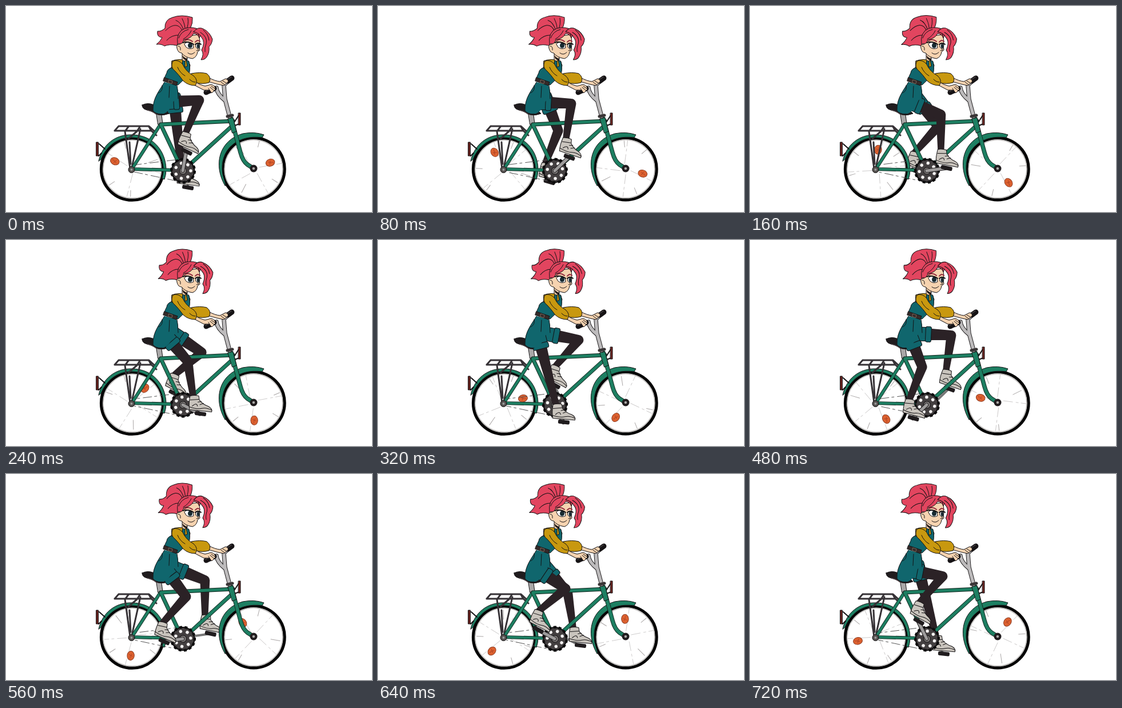
Animation, 640 px wide and 360 px high, one loop 0.8 s. Source, as an HTML page:

```html
<!DOCTYPE html>
<html lang="en">
<head>
<meta charset="utf-8">
<title>Cyclist</title>
<style>
  html, body { margin: 0; width: 100%; height: 100%; overflow: hidden; background: #fff; }
  svg { display: block; width: 100vw; height: 100vh; }
  path, line, circle, ellipse, rect { stroke-linecap: round; stroke-linejoin: round; }
  .ink { stroke: #141214; stroke-width: 1; }
  .line { fill: none; stroke: #141214; stroke-width: 1; }
  .teal { fill: #10666d; }
  .gold { fill: #c8980f; }
  .skin { fill: #f6d3b0; }
  .hair { fill: #e2455f; }
  .tights { fill: #2b2226; }
  .shoe { fill: #c9c4bd; }
  .dark { fill: #201c1e; }
  .tube { fill: none; stroke: #1d7f62; }
  .edge { fill: none; stroke: #12241d; }
  .rack { fill: none; stroke: #363236; stroke-width: 3; }
</style>
</head>
<body>
<svg viewBox="0 0 640 360" preserveAspectRatio="none">
  <defs>
    <g id="shoe">
      <rect class="dark" x="-9" y="-4" width="20" height="7" rx="2"/>
      <path class="shoe ink" d="M-21-29Q-13-32-6-31L-4-24Q3-17 13-15Q21-12 20-6L-19-5Q-22-16-21-29Z"/>
      <path class="line" d="M-20-10Q-6-7 2-10T20-9M-20-22L-5-25M-6-20L0-22M-2-16L4-19M-15-12Q-8-20-6-13"/>
    </g>
    <g id="wheel">
      <circle r="54.2" fill="#fff" stroke="#050505" stroke-width="5.2"/>
      <circle r="50.6" fill="none" stroke="#b9b6b4" stroke-width="1.2"/>
    </g>
    <g id="spokes" fill="none" stroke="#aaa6a6" stroke-width="1">
      <path d="M31 37L24 28M-34 32L-22 21M-16-46L-12-36M26-42L20-33"/>
      <path d="M10 1L49 8M-9 6L-48 12M3 10L9 48M-4-8L-10-48" stroke-width=".7" stroke-dasharray="16 6 4 5" opacity=".8"/>
    </g>
    <g id="reflector">
      <ellipse rx="8" ry="6.2" fill="#dd612f" stroke="#8f3e25" stroke-width="1"/>
      <path d="M-3-2L2 1M1-3L-2 3M3 0L5 2" stroke="#a63f24" stroke-width=".8"/>
    </g>
    <path id="main" d="M271 207L397 201M271 208L305 280M396 209L318 280"/>
    <path id="stays" d="M270 207L220 285L300 287"/>
    <path id="fork" d="M394 197L410 256Q414 271 422 277L433 284"/>
  </defs>

  <g id="far">
    <line class="crank" stroke="#777" stroke-width="4"/>
    <path class="tights leg"/>
    <use class="foot" href="#shoe"/>
    <g class="thigh">
      <rect class="teal ink" x="-12" y="-12" width="29" height="24" rx="5"/>
      <rect class="teal ink" x="13" y="-13.5" width="10" height="27" rx="3"/>
    </g>
  </g>

  <!-- wheels -->
  <use href="#wheel" x="220.7" y="285"/>
  <use href="#wheel" x="433" y="284.7"/>
  <g id="rear"><use href="#spokes"/><use href="#reflector" x="33.3" class="rf"/></g>
  <g id="front"><use href="#spokes"/><use href="#reflector" x="31" class="rf"/></g>

  <path id="chain" d="M222 278L303 268M224 290L304 307" fill="none" stroke="#555" stroke-width="1" stroke-dasharray="15 5 4 6"/>

  <!-- fenders, lights and rack -->
  <g fill="#1d7f62" class="ink">
    <path d="M162 271C168 243 191 224 220 225C255 225 279 251 280 285Q280 295 277 303L273 301Q276 291 275 281C271 251 249 230 220 230C194 230 176 245 166 268Z"/>
    <path d="M383 314C362 278 372 235 414 223Q434 219 451 225L448 230C405 224 372 251 379 294L384 312Z"/>
  </g>
  <path class="line" d="M163 241L173 250M162 262L167 257M398 205L407 191M400 209L408 206" style="stroke-width:2"/>
  <path d="M158 238h3.5v24h-3.5ZM406.500 187h3.500v21h-3.500Z" fill="#67231f" class="ink"/>
  <path class="rack" d="M190 218H254L263 226M197 210H250L262 221M190 218L197 210M214 211L208 219L217 284M234 211L229 219L214 232M235 215L220 282M254 218L250 211M216 238L218 276"/>

  <!-- frame -->
  <path d="M263 188L272 190L274 206L266 207Z" fill="#aaa8a8" class="ink"/>
  <use href="#stays" class="edge" stroke-width="6"/><use href="#stays" class="tube" stroke-width="4.300"/>
  <use href="#main" class="edge" stroke-width="7"/><use href="#main" class="tube" stroke-width="5.200"/>
  <use href="#fork" class="edge" stroke-width="7.500"/><use href="#fork" class="tube" stroke-width="5.700"/>
  <path d="M388 197L397 195L403 219L396 222Z" fill="#1d7f62" class="ink"/>
  <circle cx="219.500" cy="286" r="5.500" fill="#55514f" class="ink"/>
  <circle cx="219.500" cy="286" r="2" fill="#999"/>
  <circle cx="433" cy="284" r="6.500" class="dark"/>
  <circle cx="433" cy="284" r="2.300" fill="#a9a6a4"/>

  <!-- saddle -->
  <path class="dark ink" d="M238 173Q248 168 259 173Q274 175 285 188Q276 192 266 190Q255 183 244 181Q238 179 238 173Z"/>
  <path d="M247 182Q255 183 264 190" fill="none" stroke="#4b4143" stroke-width="1.500"/>

  <!-- stem and bars -->
  <g fill="none">
    <path id="bars" d="M391 193L383 163L381 139M383 165Q369 154 368 143L356 149M381 138L390 130" stroke="#232122" stroke-width="7.400"/>
    <path d="M391 193L383 163L381 139M383 165Q369 154 368 143L356 149M381 138L390 130" stroke="#bdbbbc" stroke-width="5.400"/>
    <path d="M387 193L396 191" stroke="#3a3536" stroke-width="5"/>
    <path d="M350 151L364 144M388 131L395 126" stroke="#161315" stroke-width="9"/>
    <path d="M349 149L359 144M388 128L394 124" stroke="#4a4547" stroke-width="1.500"/>
  </g>

  <g id="ring">
    <circle r="20" fill="#433f40" stroke="#0d0c0d" stroke-width="2"/>
    <circle r="20.300" fill="none" stroke="#0d0c0d" stroke-width="4.500" pathLength="28" stroke-dasharray="1.100 .9" style="stroke-linecap:butt"/>
    <circle r="13.500" fill="none" stroke="#f3f1f0" stroke-width="5.500" pathLength="14" stroke-dasharray="0.010 1.990"/>
    <circle r="6" fill="#807c7b" class="ink"/>
  </g>

  <g id="near">
    <line class="crank" stroke="#242223" stroke-width="7"/>
    <line class="crank" stroke="#9d9b9b" stroke-width="5"/>
    <path class="tights leg"/>
    <use class="foot" href="#shoe"/>
    <g class="thigh">
      <rect class="teal ink" x="-14" y="-13" width="32" height="26" rx="6"/>
      <rect class="teal ink" x="13" y="-14" width="10" height="28" rx="3"/>
    </g>
  </g>

  <!-- torso -->
  <path class="teal" d="M277 133C270 146 256 160 257 183Q263 190 276 188Q286 184 290 172Q293 163 301 162Q302 147 298 138Z"/>
  <path class="line" d="M277 133C270 146 256 160 257 183Q263 190 273 189M299 138Q301 150 301 162M273 139Q275 148 267 152M286 140L285 160"/>
  <path class="gold ink" d="M290 96Q302 91 319 96L322 104L318 118L290 114Z"/>
  <path class="teal ink" d="M289 108Q299 114 307 108L309 95L313 96L313 107L317 105L315 94L320 97Q323 110 320 119Q312 128 301 138L276 130Q278 122 281 117Q282 110 289 108Z"/>
  <path d="M277 125L300 133L298 139L275 131Z" fill="#352a29" class="ink"/>
  <path d="M285 129L291 131L290 136L284 134Z" fill="none" stroke="#78675a" stroke-width="1"/>

  <!-- arms -->
  <path class="skin ink" d="M354 125Q365 131 374 132L384 127Q390 129 388 133L381 139L371 137L353 132Z"/>
  <path class="line" d="M379 131L386 135M376 133L383 138"/>
  <path class="gold ink" d="M324 118Q340 115 351 118Q360 125 355 134Q344 137 330 134Z"/>
  <path class="skin ink" d="M330 132Q339 138 348 140L359 137Q367 140 366 146L360 152L355 147L346 147L329 138Z"/>
  <path class="line" d="M357 142L364 148M359 140L366 145M354 144L358 150"/>
  <path class="gold ink" d="M292 96Q302 93 309 102Q314 114 328 122Q337 130 331 139Q319 139 310 131Q302 120 296 114Q286 107 292 96Z"/>
  <path class="line" d="M300 107Q304 117 313 122M331 133Q325 133 321 128"/>

  <!-- head -->
  <g id="tail">
    <path class="hair ink" d="M310 54C304 53 305 65 298 69Q286 66 277 70Q272 66 263 67Q270 62 273 55Q263 54 265 44Q271 45 278 39Q277 24 291 20Q307 14 326 20Q327 30 322 40Q315 49 310 54Z"/>
    <path class="line" d="M309 45C302 27 288 34 279 43M311 43Q306 28 297 25M315 42Q320 32 318 21M303 51Q290 50 281 60M313 43Q314 34 308 22"/>
  </g>
  <path class="skin ink" d="M308 82L308 94Q313 99 317 93L316 86Z"/>
  <path d="M308 86Q313 92 318 92L316 96L310 92Z" fill="#1b1516"/>
  <path class="skin ink" d="M306 54L337 50Q340 62 338 69L339 77L335 80Q334 89 326 92Q313 90 307 82Q301 82 299 74Q297 66 304 67Z"/>
  <path class="line" d="M301 70Q306 70 305 77M333 72L337 77L333 78M318 82Q324 87 330 81"/>
  <path d="M312 66Q319 60 327 66L328 73Q321 77 315 72Z" fill="#fff" class="ink"/>
  <path d="M332 67Q336 64 339 68L338 74Q334 75 332 72Z" fill="#fff" class="ink"/>
  <ellipse cx="322" cy="69" rx="4" ry="4.600" fill="#182a31"/>
  <ellipse cx="336" cy="70" rx="2.300" ry="3.700" fill="#182a31"/>
  <path d="M309 64Q318 61 328 67M331 67Q336 63 341 67" fill="none" stroke="#141214" stroke-width="2"/>
  <path d="M312 61Q319 56 326 62M331 63Q335 58 339 62" fill="none" stroke="#8f2638" stroke-width="2"/>
  <path class="hair ink" d="M300 67Q297 45 313 39Q329 35 341 43Q341 51 338 56Q335 48 328 48Q324 57 311 59Q308 68 303 66Z"/>
  <path class="line" d="M302 56Q306 44 319 41M310 58Q320 52 324 43M333 41Q337 47 337 53"/>
  <g id="lock">
    <path class="hair ink" d="M328 45Q336 35 345 40Q356 45 361 58Q360 67 355 71Q356 82 351 89Q348 94 341 94Q347 84 342 77Q349 63 342 55Q338 47 328 45Z"/>
    <path class="line" d="M340 46Q353 54 350 66Q347 73 348 80M345 42Q354 49 355 60"/>
  </g>
</svg>
<script>
const STEP = 80, STEPS = 10, THIGH = 58, SHIN = 64, CRANK = 34;
const rad = Math.PI / 180;
const $ = id => document.getElementById(id);
const set = (el, attrs) => { for (const k in attrs) el.setAttribute(k, attrs[k]); };
const polar = (p, r, a) => [p[0] + r * Math.cos(a), p[1] + r * Math.sin(a)];

// Tapered limb between two joints
function limb(a, b, wa, wb) {
  const n = Math.atan2(b[1] - a[1], b[0] - a[0]) + Math.PI / 2;
  const pts = [polar(a, wa, n), polar(a, -wa, n), polar(b, -wb, n), polar(b, wb, n)];
  return 'M' + pts.map(p => p.map(v => v.toFixed(2)).join(' ')).join('L') + 'Z';
}

const disc = ([x, y], r) => `M${x - r} ${y}a${r} ${r} 0 1 1 ${2 * r} 0a${r} ${r} 0 1 1 ${-2 * r} 0Z`;

function poseLeg(id, dx, dy, deg) {
  const leg = $(id), hip = [280 + dx, 168 + dy], axle = [309 + dx, 288 + dy];
  const pedal = polar(axle, CRANK, deg * rad);
  const tilt = 18 + 12 * Math.cos((deg - 235) * rad);
  const ankle = polar(pedal, 30.9, tilt * rad + Math.atan2(-27, -15));
  const vx = ankle[0] - hip[0], vy = ankle[1] - hip[1], d = Math.hypot(vx, vy);
  const bend = (THIGH ** 2 + d * d - SHIN ** 2) / (2 * THIGH * d);
  const dir = Math.atan2(vy, vx) - Math.acos(Math.min(1, bend));
  const knee = polar(hip, THIGH, dir);
  leg.querySelectorAll('.crank').forEach(c =>
    set(c, { x1: axle[0], y1: axle[1], x2: pedal[0], y2: pedal[1] }));
  set(leg.querySelector('.leg'), {
    d: limb(hip, knee, 11, 8.5) + disc(knee, 8.5) + limb(knee, ankle, 8.5, 5.5)
  });
  set(leg.querySelector('.foot'), { transform: `translate(${pedal}) rotate(${tilt})` });
  set(leg.querySelector('.thigh'), { transform: `translate(${hip}) rotate(${dir / rad})` });
}

function draw(now) {
  const k = Math.floor(now / STEP) % STEPS, turn = k * 360 / STEPS;
  poseLeg('near', 0, 0, turn - 80);
  poseLeg('far', 14, -4, turn + 100);
  set($('ring'), { transform: `translate(309.5 288) rotate(${turn})` });
  set($('rear'), { transform: `translate(221 284.3) rotate(${turn + 203})` });
  set($('front'), { transform: `translate(433 284.3) rotate(${turn - 20})` });
  set($('chain'), { 'stroke-dashoffset': -k * 6 });
  const sway = (1 - Math.cos(turn * rad)) / 2;
  set($('tail'), {
    transform: `translate(318 45) scale(${1 - 0.09 * sway} ${1 + 0.05 * sway}) translate(-318 -45)`
  });
  set($('lock'), { transform: `rotate(${-5 * sway} 340 42)` });
}

function tick() {
  draw(performance.now());
  requestAnimationFrame(tick);
}
tick();
</script>
</body>
</html>
```
